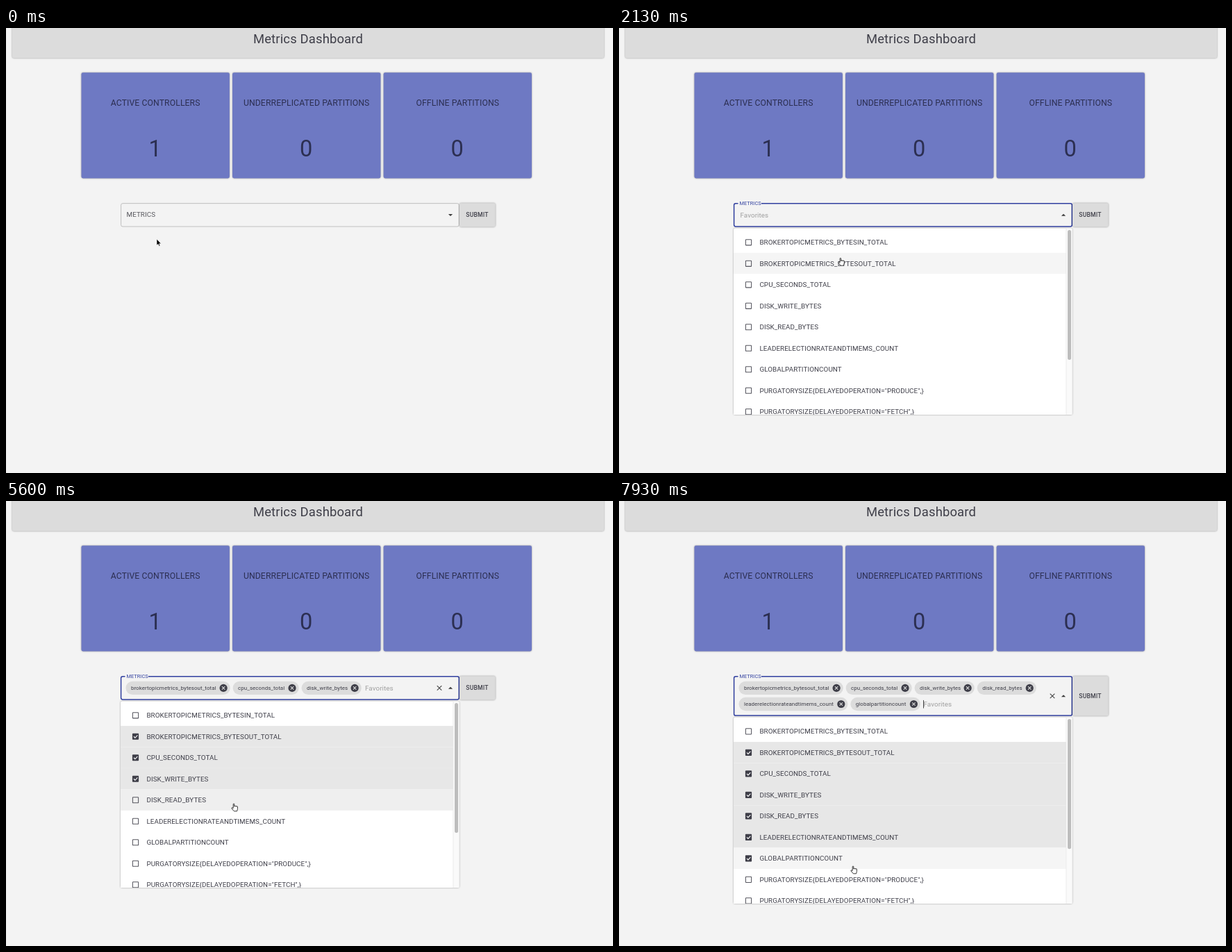
Write an HTML page that moves like this. It is 874 px wide and 641 px high and loops after 8000 ms.

```html
<!DOCTYPE html>
<html lang="en">
<head>
<meta charset="utf-8">
<title>Metrics Dashboard</title>
<style>
  html, body { margin: 0; width: 100%; height: 100%; overflow: hidden; background: #f3f3f3; }
  svg { display: block; }
  text { font-family: Roboto, Arial, sans-serif; letter-spacing: .0094em; fill: #3e3e48; white-space: pre; }
  .mid { text-anchor: middle; }
  .card { fill: #2c2f52; }
  .button { font-weight: 500; letter-spacing: .02857em; }
  .hover { letter-spacing: .016em; }
  .raised { filter: drop-shadow(0 .8px .8px rgba(0, 0, 0, .38)); }
  .inset { filter: drop-shadow(1px 1.5px 2px rgba(0, 0, 0, .28)); }
</style>
</head>
<body>
<svg id="stage" width="100%" height="100%" viewBox="0 0 874 641"></svg>
<script>
const LOOP = 8000, TICKS = 120;
const BG = '#f3f3f3', GREY = '#dcdcdc', INK = '#3e3e48', ACCENT = '#303f9f';
const OPENED = 18, ROW = 30.5, LIST_TOP = 288.5, FIELD_TOP = 252, LINE_STEP = 23.1;

const options = [
  'BROKERTOPICMETRICS_BYTESIN_TOTAL', 'BROKERTOPICMETRICS_BYTESOUT_TOTAL', 'CPU_SECONDS_TOTAL',
  'DISK_WRITE_BYTES', 'DISK_READ_BYTES', 'LEADERELECTIONRATEANDTIMEMS_COUNT', 'GLOBALPARTITIONCOUNT',
  'PURGATORYSIZE{DELAYEDOPERATION="PRODUCE",}', 'PURGATORYSIZE{DELAYEDOPERATION="FETCH",}'
];

// One entry per selection: option i + 1 becomes checked at `tick`.
const chips = [
  { tick: 40, x: 172.5, end: 322.7, line: 0 },
  { tick: 56, x: 326.7, end: 421.6, line: 0 },
  { tick: 71, x: 425.6, end: 511.7, line: 0 },
  { tick: 85, x: 515.8, end: 600.8, line: 0 },
  { tick: 106, x: 172.5, end: 329.4, line: 1 },
  { tick: 119, x: 333.4, end: 434, line: 1 }
];
const inputX = [174.5, 327.5, 426.5, 517, 173.5, 334.5, 438.5];
const caretToggles = [18, 25, 33, 40, 47, 55, 56, 63, 70, 78, 85, 92, 100, 106, 115];
const presses = [[39, 40], [55, 56], [70, 71], [84, 87], [105, 106], [118, 119]];

// Pointer stops: tick, x, y of the hot spot.
const pointerPath = [
  [0, 217, 304], [11, 311, 272], [25, 311, 272], [34, 320, 340], [40, 320, 340], [46, 323, 371.5],
  [59, 323, 371.5], [64, 325, 408], [74, 325, 408], [78, 328, 436], [86, 328, 436], [96, 333.5, 485.5],
  [97, 333.5, 485.5], [98, 334, 486], [106, 334, 486], [112, 336, 508], [117, 336, 508], [119, 337, 526]
];

const clamp = v => Math.max(0, Math.min(1, v));
const smooth = u => u * u * (3 - 2 * u);

function pointerAt(tick) {
  const next = pointerPath.findIndex(stop => stop[0] > tick);
  if (next < 0) return pointerPath[pointerPath.length - 1].slice(1);
  const [t0, x0, y0] = pointerPath[next - 1], [t1, x1, y1] = pointerPath[next];
  const u = smooth((tick - t0) / (t1 - t0));
  return [x0 + (x1 - x0) * u, y0 + (y1 - y0) * u];
}

const rect = (x, y, w, h, fill, extra = '') =>
  `<rect x="${x}" y="${y}" width="${w}" height="${h}" fill="${fill}" ${extra}/>`;

const path = (d, extra) => `<path d="${d}" ${extra}/>`;

// Text whose capitals are vertically centred on cy.
const label = (str, x, cy, size, cls = '', extra = '') =>
  `<text x="${x}" y="${cy + size * .355}" font-size="${size}" class="${cls}" ${extra}>${str}</text>`;

const cross = (x, y, r, color, width) =>
  path(`M${x - r} ${y - r}l${2 * r} ${2 * r}m0 ${-2 * r}l${-2 * r} ${2 * r}`, `stroke="${color}" stroke-width="${width}"`);

const card = (x, title, value) =>
  rect(x, 64.2, 213.4, 152.2, '#6e79c3', 'rx="2.4" class="raised"') +
  label(title, x + 106.7, 107.3, 12.2, 'mid card') +
  label(value, x + 106.2, 173.6, 32.5, 'mid card');

const header =
  rect(0, 0, 1, 641, '#ebebeb') +
  rect(9, -20, 852, 63.3, GREY, 'rx="2.4" class="raised"') +
  label('Metrics Dashboard', 435, 15.3, 18.4, 'mid') +
  card(108.5, 'ACTIVE CONTROLLERS', 1) +
  card(326, 'UNDERREPLICATED PARTITIONS', 0) +
  card(543.6, 'OFFLINE PARTITIONS', 0);

function chip({ x, end, line }, i) {
  const y = 269.4 + line * LINE_STEP, icon = end - 9.6;
  return rect(x, y - 9.7, end - x, 19.4, GREY, 'rx="9.7"') +
    label(options[i + 1].toLowerCase(), x + 7.4, y, 7.93) +
    `<circle cx="${icon}" cy="${y}" r="5.6" fill="${INK}"/>` +
    cross(icon, y, 2.2, GREY, 1.1);
}

function field(tick, count, height, hovered) {
  const open = tick >= OPENED, mid = FIELD_TOP + height / 2;
  const shrink = open ? 1 - (1 - clamp((tick - 17) / 3)) ** 3 : 0;
  const stroke = open ? ACCENT : hovered ? '#2b2b2b' : '#b9b9b9', width = open ? 1.5 : .9;
  let out = rect(165.6, FIELD_TOP + .7, 486.7, height - 1.4, 'none', `rx="2.4" stroke="${stroke}" stroke-width="${width}"`);
  if (open) {
    const glow = clamp((21 - tick) / 3);
    if (glow) out += rect(170.5, 258, 442.5, 22.5, '#f6f6f6', `class="inset" opacity="${glow}"`);
    if (tick > OPENED) out += rect(171.5, 251, 33.4, 4, BG);
    out += chips.slice(0, count).map(chip).join('');
    const x = inputX[count], y = 269.6 + (count > 3 ? LINE_STEP : 0);
    out += label('Favorites', x, y, 9.8, '', `style="fill:#9f9f9f" opacity="${1 - glow * .4}"`);
    if (caretToggles.filter(t => t <= tick).length % 2) out += rect(x - .4, y - 5.8, .9, 11.6, '#333');
    if (count) out += cross(624, mid, 3.3, '#444', 1.1);
  }
  const dir = open ? -1 : 1;
  out += path(`M636.9 ${mid - dir * 1.4}h6.2l-3.1 ${dir * 3.1}z`, 'fill="#3a3a3a"');
  out += label('METRICS', 173.5, 269 - 16.6 * shrink, 9.8 * (1 - .25 * shrink), '', `style="fill:${open ? ACCENT : '#56565c'}"`);
  out += rect(653, FIELD_TOP + .2, 51.6, height - .4, GREY, 'rx="2.4" class="raised"');
  return out + label('SUBMIT', 678.5, mid, 8.54, 'mid button');
}

function option(name, i, checked, hovered, pressed) {
  const top = 4.9 + i * ROW, mid = top + ROW / 2;
  const fill = hovered ? (pressed ? '#efefef' : '#f5f5f5') : checked ? '#e7e7e7' : '#fff';
  const box = checked
    ? rect(16.9, mid - 4.5, 9.2, 9.2, INK, 'rx="1"') +
      path(`M19 ${mid + .1}l1.9 2 3.5-3.8`, 'fill="none" stroke="#fff" stroke-width="1.1"')
    : rect(17.4, mid - 4, 8.2, 8.2, 'none', 'rx=".7" stroke="#55555e" stroke-width="1.05"');
  return rect(0, top, 479, ROW, fill) + box + label(name, 37.4, mid, 9.8, hovered ? 'hover' : '');
}

function list(tick, count, shift, y) {
  const top = LIST_TOP + shift;
  const row = Math.floor((y - top - 4.9) / ROW);
  // The highlight stays on its option when the list slides down under the pointer.
  const active = count > 3 ? Math.max(4, row) : row;
  const pressed = presses.some(([from, to]) => tick >= from && tick < to);
  const rows = options.map((name, i) => option(name, i, i > 0 && i <= count, i === active, pressed)).join('');
  return rect(165, top, 487.6, 268.4, '#fff', 'rx="2" class="raised"') +
    `<svg x="165" y="${top}" width="487.6" height="268.4">${rows}` +
    rect(478.8, 0, 8.8, 268.4, '#fafafa') + rect(478.6, 0, .7, 268.4, '#e6e6e6') +
    rect(481, 2.4, 5, 187.2, '#bdbdbd', 'rx="2.5"') + '</svg>';
}

const cursors = {
  arrow: path('M0 0V9.1L2.1 7.3 3.5 10.3 4.9 9.7 3.6 6.7H6.3Z', 'fill="#000" stroke="#fff" stroke-width=".6"'),
  beam: path('M-2.4-5.2Q0-5.2 0-4Q0-5.2 2.4-5.2M0-4V4.6M-2.4 5.8Q0 5.8 0 4.6Q0 5.8 2.4 5.8M-1 1.8H1',
    'fill="none" stroke="#222" stroke-width="1"'),
  hand: path('M-.8 6.5V.8a.8.8 0 0 1 1.6 0V4.1a.8.8 0 0 1 1.6 0a.8.8 0 0 1 1.6.2a.7.7 0 0 1 1.4.2V7.5L4.6 10.8H.4L-3 6.9Q-3.4 5.8-2.2 5.7Z',
    'fill="#fff" stroke="#222" stroke-width=".9" stroke-linejoin="round"')
};

function scene(tick) {
  const [x, y] = pointerAt(tick);
  const count = chips.filter(c => c.tick <= tick).length;
  const shift = count > 3 ? LINE_STEP : 0;
  const open = tick >= OPENED, inField = y < 286.5;
  const cursor = inField ? 'beam' : open ? 'hand' : 'arrow';
  return header +
    field(tick, count, 34.7 + shift, inField) +
    (open ? list(tick, count, shift, y) : '') +
    `<g transform="translate(${x} ${y})">${cursors[cursor]}</g>`;
}

const stage = document.getElementById('stage');
const start = performance.now();
let shown = -1;

function render() {
  const time = (performance.now() - start) % LOOP;
  const tick = Math.floor((time + 4) * TICKS / LOOP) % TICKS;
  if (tick !== shown) stage.innerHTML = scene(shown = tick);
  requestAnimationFrame(render);
}
render();
</script>
</body>
</html>
```
